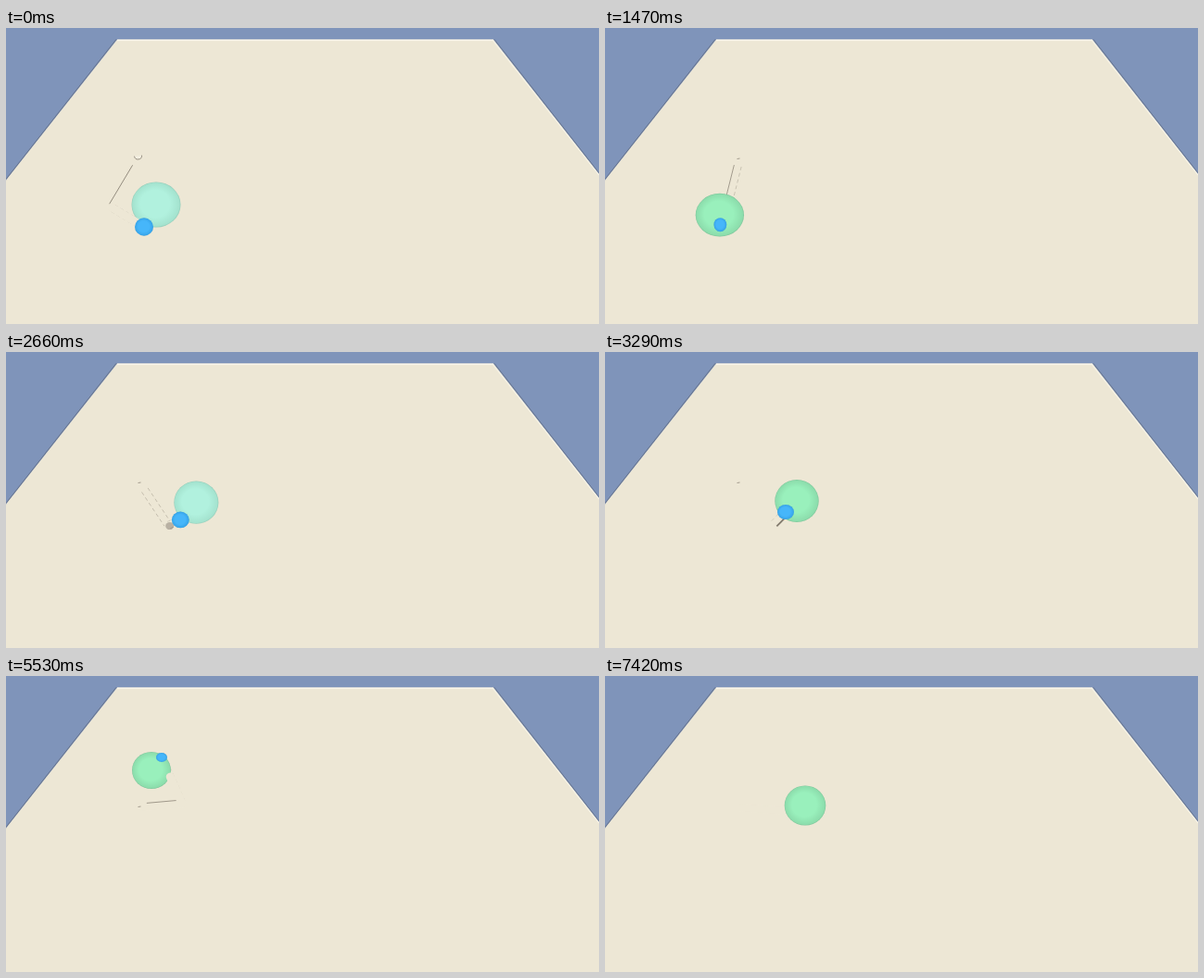
An HTML page with a canvas for the animation above (7.49 s loop, 640 by 320 pixels).

```html
<!DOCTYPE html>
<html lang="en">
<head>
<meta charset="utf-8">
<title>Reacher arm</title>
<style>
html, body { margin: 0; width: 100%; height: 100%; overflow: hidden; background: #7f94ba; }
canvas { display: block; width: 640px; height: 320px; }
</style>
</head>
<body>
<canvas id="stage" width="640" height="320"></canvas>
<script>
const ctx = document.getElementById('stage').getContext('2d');
const LOOP = 7490, STEP = 70;
const GROUND = '#ede7d5';
const SHOULDER = [145, 142];

// Poses: goal centre and radii, elbow, hand and its radii,
// opacity of the two edges of each link, reach of the forearm in front of the goal
const poses = [
  { t: 0,    goal: [162, 191], size: [26.5, 24.5], elbow: [114, 194], hand: [149, 215], ball: [10, 9.7],  upper: [.75, 0],  lower: [.35, .35], front: .74 },
  { t: 770,  goal: [68, 174],  size: [28, 23.5],   elbow: [117, 171], hand: [90, 171],  ball: [4, 5.5],   upper: [.65, 0],  lower: [0, 1],     front: 0 },
  { t: 2170, goal: [204, 164], size: [24.3, 23.2], elbow: [170, 188], hand: [183, 188], ball: [9.8, 9.5], upper: [.6, .6],  lower: [.2, .2],   front: 0 },
  { t: 3290, goal: [207, 161], size: [23.7, 23],   elbow: [182, 186], hand: [195, 173], ball: [9, 8],     upper: [0, 0],    lower: [.9, .2],   front: 0 },
  { t: 4340, goal: [210, 119], size: [21.2, 21],   elbow: [196, 160], hand: [210, 119], ball: [0, 0],     upper: [.55, 0],  lower: [0, 0],     front: 0 },
  { t: 5530, goal: [157, 102], size: [21, 20],     elbow: [190, 138], hand: [168, 88],  ball: [6, 5],     upper: [0, .65],  lower: [.15, 0],   front: .58 },
  { t: 7420, goal: [216, 140], size: [22.3, 21.6], elbow: [196, 146], hand: [216, 140], ball: [0, 0],     upper: [0, 0],    lower: [0, 0],     front: 0 }
];

const mix = (a, b, k) => a + (b - a) * k;
const mix2 = (a, b, k) => [mix(a[0], b[0], k), mix(a[1], b[1], k)];
const scaleAt = y => (406 + 1.57 * (y - 13)) / 605;

// Screen point to polar position on the floor around the shoulder
function toFloor([x, y]) {
  const dy = y - 140;
  const fx = ((x - 323) / scaleAt(y) + 180) / 73;
  const fz = dy / (47.4 + .247 * dy);
  return [Math.atan2(fz, fx), Math.hypot(fx, fz)];
}

function toScreen([angle, r]) {
  const fz = r * Math.sin(angle);
  const y = 140 + 47.4 * fz / (1 - .247 * fz);
  return [323 + (73 * r * Math.cos(angle) - 180) * scaleAt(y), y];
}

const swing = (a, b, k) => toScreen(mix2(toFloor(a), toFloor(b), k));

function poseAt(t) {
  let i = 0;
  while (i < poses.length - 2 && t >= poses[i + 1].t) i++;
  const a = poses[i], b = poses[i + 1];
  const k = (t - a.t) / (b.t - a.t);
  const goal = swing(a.goal, b.goal, k);
  const offset = p => [p.hand[0] - p.goal[0], p.hand[1] - p.goal[1]];
  const d = mix2(offset(a), offset(b), k);
  const p = { goal, hand: [goal[0] + d[0], goal[1] + d[1]], elbow: swing(a.elbow, b.elbow, k) };
  for (const key of ['size', 'ball', 'upper', 'lower']) p[key] = mix2(a[key], b[key], k);
  p.front = mix(a.front, b.front, k);
  return p;
}

function line(a, b, color, width) {
  ctx.strokeStyle = color;
  ctx.lineWidth = width;
  ctx.beginPath();
  ctx.moveTo(...a);
  ctx.lineTo(...b);
  ctx.stroke();
}

function sphere([x, y], [rx, ry], inner, outer, rim) {
  if (rx < .5 || ry < .5) return;
  ctx.save();
  ctx.translate(x, y);
  ctx.scale(1, ry / rx);
  const g = ctx.createRadialGradient(-rx * .1, -rx * .1, 0, 0, 0, rx);
  g.addColorStop(0, inner);
  g.addColorStop(.6, inner);
  g.addColorStop(.95, outer);
  g.addColorStop(1, rim);
  ctx.fillStyle = g;
  ctx.beginPath();
  ctx.arc(0, 0, rx, 0, Math.PI * 2);
  ctx.fill();
  ctx.restore();
}

function floor() {
  ctx.fillStyle = '#7f94ba';
  ctx.fillRect(0, 0, 640, 320);
  ctx.fillStyle = GROUND;
  ctx.beginPath();
  ctx.moveTo(120, 12.5);
  ctx.lineTo(526, 12.5);
  ctx.lineTo(640, 158);
  ctx.lineTo(640, 320);
  ctx.lineTo(0, 320);
  ctx.lineTo(0, 164.5);
  ctx.fill();
  line([119, 12.3], [0, 163.5], 'rgba(80,86,100,.55)', 1);
  line([527, 12.3], [640, 156.7], 'rgba(80,86,100,.5)', 1);
  line([120, 13.3], [526, 13.3], '#faf6e9', 1.6);
  line([525.5, 13.5], [640, 159], '#f8f4e6', 1.2);
}

function link(a, b, edges, from, to) {
  const len = Math.hypot(b[0] - a[0], b[1] - a[1]) || 1;
  const n = [-(b[1] - a[1]) / len * 4, (b[0] - a[0]) / len * 4];
  line(a, b, GROUND, 8);
  edges.forEach((alpha, i) => {
    if (alpha < .03) return;
    const side = i ? -1 : 1;
    const at = k => {
      const p = mix2(a, b, k);
      return [p[0] + side * n[0], p[1] + side * n[1]];
    };
    ctx.setLineDash(alpha < .58 ? [4, 3] : []);
    line(at(from), at(to), `rgba(118,110,98,${alpha})`, alpha > .85 ? 1.8 : 1);
  });
  ctx.setLineDash([]);
}

function shoulder(t) {
  if (t < 350 || (t > 1820 && t < 2660)) {
    ctx.fillStyle = '#f3eee0';
    ctx.strokeStyle = 'rgba(120,112,100,.75)';
    ctx.lineWidth = 1;
    ctx.beginPath();
    ctx.arc(142.5, 138, 4, -.1, Math.PI * .95);
    ctx.fill();
    ctx.stroke();
  } else if (t < 7000) {
    line([142.5, 141.5], [145.5, 141], 'rgba(120,112,100,.65)', 1);
  }
}

function draw(now) {
  const ms = now % LOOP;
  const t = ms < 140 ? 0 : Math.floor(ms / STEP) * STEP;
  const p = poseAt(t);
  const apart = t < 420 || (t > 1890 && t < 2730);

  ctx.lineCap = 'butt';
  floor();
  link(SHOULDER, p.elbow, p.upper, .16, .97);
  link(p.elbow, p.hand, p.lower, .04, .78);
  shoulder(t);

  if (t > 1890 && t < 2730) {
    ctx.fillStyle = 'rgba(150,142,130,.6)';
    ctx.beginPath();
    ctx.ellipse(p.elbow[0] + 1.5, p.elbow[1] + .8, 4.5, 4, 0, 0, Math.PI * 2);
    ctx.fill();
  }

  if (apart) sphere(p.goal, p.size, '#b1f1de', '#a4e3cf', '#93cdb9');
  else sphere(p.goal, p.size, '#99f0bc', '#8cddac', '#7cc599');

  if (p.front > .3) {
    ctx.lineCap = 'round';
    line(p.elbow, mix2(p.elbow, p.hand, p.front), GROUND, 9);
  }
  sphere(p.hand, p.ball, '#46b6fa', '#37a5ea', '#3294d2');
}

const start = performance.now();
function tick() {
  draw(performance.now() - start);
  requestAnimationFrame(tick);
}
tick();
</script>
</body>
</html>
```
